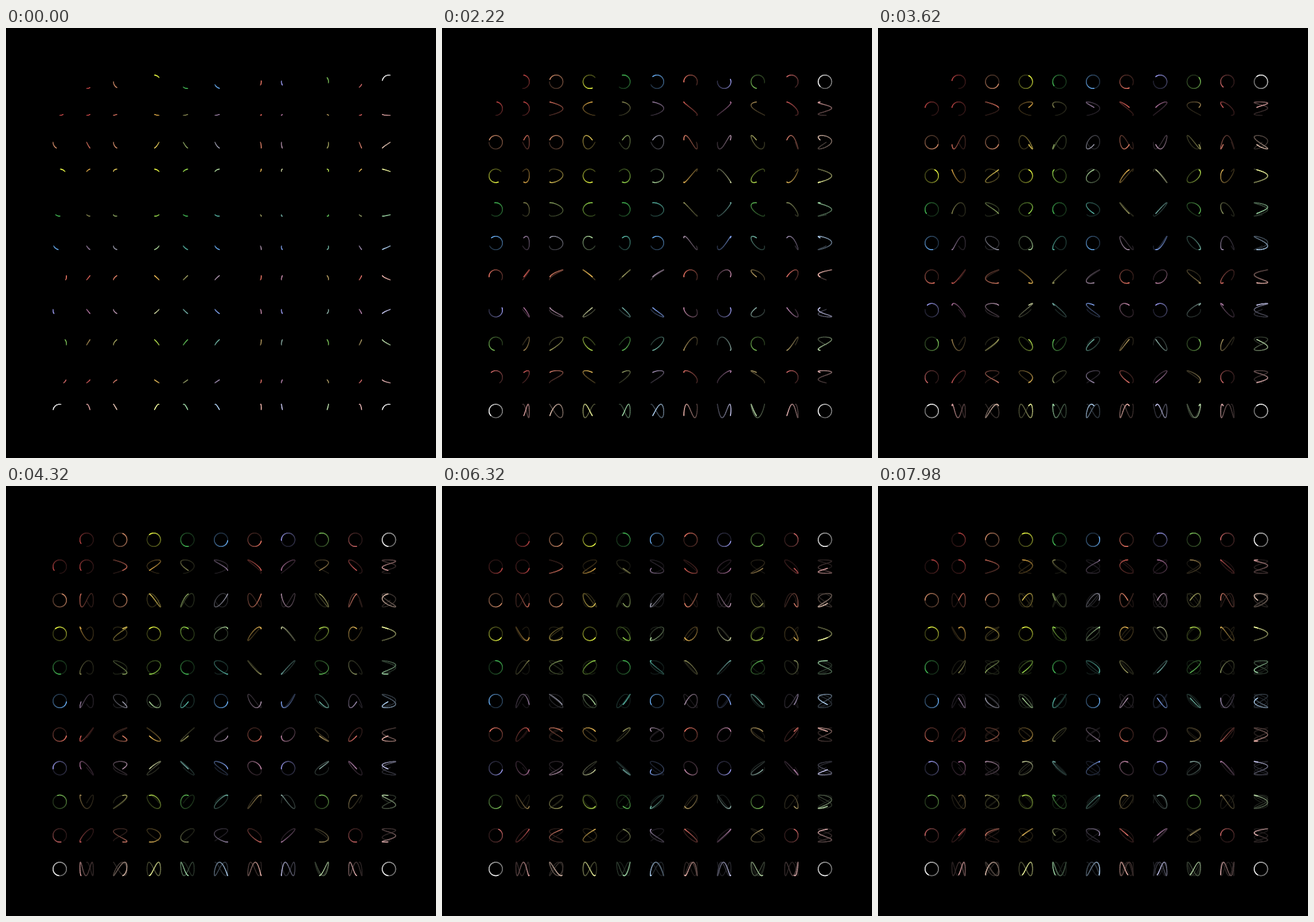
Animation of 720x720 px, one loop 8 s. Source, as an HTML page with a canvas:

```html
<!DOCTYPE html>
<html lang="en">
<head>
<meta charset="utf-8">
<title>Lissajous table</title>
<style>
  html, body { margin: 0; width: 100%; height: 100%; overflow: hidden; background: #000; }
  canvas { display: block; width: 100vmin; height: 100vmin; }
</style>
</head>
<body>
<canvas id="stage" width="720" height="720"></canvas>
<script>
const LOOP = 8000, GAP = 56.25, RADIUS = GAP / 5;
const WARMUP = 3600;          // steps since all oscillators stood at angle 0
const FIRST = -10;            // step at which the trails begin
const FADE = 30, TAIL = 110;
const ctx = document.getElementById('stage').getContext('2d');

// Degrees per step and colour of each oscillator
const speeds = [2.9833, 5.9667, 4.4233, 3.9756, 4.9711, 3.7022, 3.6583, 4.7103, 3.2939, 8.8467];
const palette = 'b44 c86 ef4 4b5 6ae e76 99e 7b5 c66 fff'.split(' ');

const oscillators = speeds.map((speed, i) => ({
  speed: speed * Math.PI / 180,
  color: [...palette[i]].map(digit => parseInt(digit, 16) * 17)
}));

const center = i => i ? 135 + (i - 1) * GAP : 90;
const angle = (o, n) => -o.speed * (n + WARMUP);
const mix = (a, b, t) => a.map((v, k) => v + (b[k] - v) * t);
const rgb = c => `rgb(${c.map(Math.round).join()})`;

// Column sets x, row sets y; the headers use one oscillator for both
const cells = [];
for (let row = 0; row <= 10; row++) {
  for (let col = 0; col <= 10; col++) {
    if (!row && !col) continue;
    const ox = oscillators[(col || row) - 1];
    const oy = oscillators[(row || col) - 1];
    const color = mix(ox.color, oy.color, 0.5);
    const rest = color.map(v => v * 0.1 + 8);
    cells.push({ x: center(col), y: center(row), ox, oy, color, rest });
  }
}

function trail(cell, from, to, color) {
  ctx.strokeStyle = rgb(color);
  ctx.beginPath();
  for (let n = from; n <= to; n++) {
    ctx.lineTo(cell.x + RADIUS * Math.cos(angle(cell.ox, n)),
               cell.y + RADIUS * Math.sin(angle(cell.oy, n)));
  }
  ctx.stroke();
}

function drawCell(cell, step) {
  let n = Math.max(FIRST, step - TAIL);
  if (n > FIRST) trail(cell, FIRST, n, cell.rest);
  while (n < step) {
    const end = Math.min(n + 2, step);
    trail(cell, n, end, mix(cell.rest, cell.color, Math.exp((end - step) / FADE)));
    n = end;
  }
}

// Three steps every 140 ms, held for 20, 100 and 20 ms
function stepAt(t) {
  const r = t % 140;
  return 3 * Math.floor(t / 140) + (r >= 20) + (r >= 120);
}

function draw(step) {
  ctx.fillStyle = '#000';
  ctx.fillRect(0, 0, 720, 720);
  ctx.lineWidth = 1.6;
  ctx.lineCap = ctx.lineJoin = 'round';
  cells.forEach(cell => drawCell(cell, step));
}

const start = performance.now();
let shown = -1;
function tick() {
  const step = stepAt((performance.now() - start) % LOOP);
  if (step !== shown) draw(shown = step);
  requestAnimationFrame(tick);
}
tick();
</script>
</body>
</html>
```
